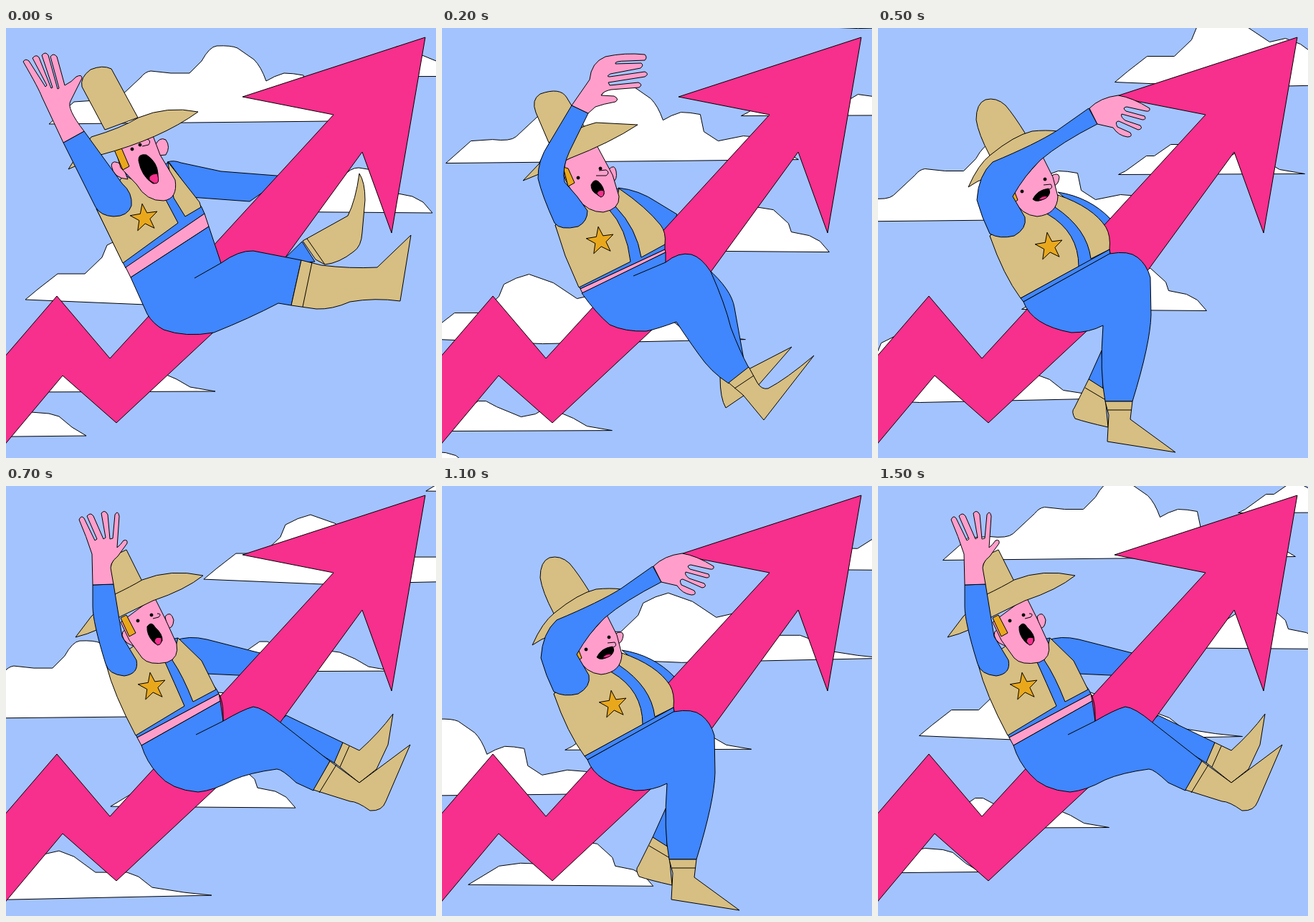
Recreate the animation shown at these times as an HTML page with a canvas. Size 600 by 600 pixels, loop 1600 ms.

```html
<!DOCTYPE html>
<html lang="en">
<head>
<meta charset="utf-8">
<title>Riding the arrow</title>
<style>
html, body { margin: 0; width: 100%; height: 100%; overflow: hidden; background: #a3c3ff; }
canvas { display: block; }
</style>
</head>
<body>
<canvas id="stage" width="600" height="600"></canvas>
<script>
const ctx = document.getElementById('stage').getContext('2d');
const COLORS = { sky: '#a3c3ff', cloud: '#fff', blue: '#4086fd', skin: '#ff9ecb', tan: '#d7be82',
  hot: '#f72f8d', gold: '#e9a81c', ink: '#000', line: null };
const STEP = 100, STEPS = 16, DRIFT = 27.3, LOOP_SHIFT = 440;

const shape = (color, d) => ({ fill: COLORS[color], path: new Path2D(d) });
const dot = (x, y, r = 2, color = 'ink') =>
  shape(color, `M${x - r} ${y}a${r} ${r} 0 1 0 ${2 * r} 0a${r} ${r} 0 1 0 ${-2 * r} 0Z`);

function star(x, y) {
  const points = Array.from({ length: 10 }, (_, i) => {
    const a = i * Math.PI / 5 - 1.72, r = i % 2 ? 8 : 20;
    return `${x + r * Math.cos(a)} ${y + r * Math.sin(a)}`;
  });
  return shape('gold', `M${points.join('L')}Z`);
}

const clouds = [
  'M60 134L95 103 125 101Q150 104 158 97L188 69Q194 61 202 60L230 63 256 63 273 46Q284 26 294 25Q314 24 323 28L346 44Q356 54 363 74Q374 67 388 63Q400 63 415 66L420 90 440 103 475 96 500 98 514 102 532 117 552 129Z',
  'M337 256L380 230 410 226 440 227 470 208Q480 195 492 195L517 199 538 218 542 230 567 235 582 243 595 258Z',
  'M472 68L482 63 511 42 522 42 545 26 556 26 571 34 605 48 625 44 635 38 657 41 678 50 697 61 732 67Z',
  'M27 379L45 364 72 343 110 343 134 320 141 303Q158 293 176 289L210 301 243 323 265 318 286 326 316 348 360 348 376 354 395 369 440 376 478 380 195 386Z'
].map(d => shape('cloud', d));

const arrow = shape('hot', 'M-9 467L71 374 145 461 457 121 330 96 585 13 538 286 497 173 365 354 154 551 79 485-9 590Z');

// Each pose: limbs behind the arrow, then everything in front of it.
const leaningBack = {
  far: [
    shape('blue', 'M225 187Q234 184 244 188L300 200 390 207 340 242 258 236Z'),
    shape('blue', 'M413 298L380 330 431 326Z'),
    shape('tan', 'M414 297L477 262Q488 240 493 203Q501 215 501 240L497 285Q496 305 485 312Q465 328 445 330L432 323Z'),
    shape('line', 'M420 294L445 330')
  ],
  near: [
    shape('blue', 'M126 252L165 205 228 188 273 250 277 259 167 335Z'),
    shape('tan', 'M126 252L163 328 240 272 222 238 165 205Z'),
    shape('tan', 'M226 187L270 243 272 250 250 263 234 237Z'),
    star(193, 265),
    shape('skin', 'M167 334L277 259 283 277 174 348Z'),
    shape('blue', 'M174 348L283 277 300 328Q325 310 345 311L412 324 398 387 380 384Q340 405 290 425Q250 432 220 421Q205 413 197 399Z'),
    shape('line', 'M300 328L263 349'),
    shape('tan', 'M412 324L440 331Q480 336 518 334L565 289 550 381Q515 376 480 382Q455 393 433 392L398 387Z'),
    shape('line', 'M427 327L414 389'),
    shape('tan', 'M138 142L106 82Q103 69 118 58Q135 51 147 57L184 125Z'),
    shape('skin', 'M208 164Q214 151 223 156Q230 166 223 177L212 178Z'),
    shape('skin', 'M162 191Q148 182 147 192Q150 210 170 211Z'),
    shape('skin', 'M150 160L203 145 215 177 236 212Q240 238 220 241Q196 242 182 218L160 195Z'),
    shape('gold', 'M151 170L160 165 172 193 163 198Z'),
    shape('ink', 'M185 185Q184 175 196 177Q211 187 212 203Q213 218 205 217Q189 207 185 185Z'),
    shape('hot', 'M200 212Q198 204 211 203Q216 218 207 217Z'),
    dot(176, 169), dot(187, 163),
    shape('line', 'M190 165L199 163Q203 157 197 155'),
    shape('tan', 'M87 197L98 180 119 152Q160 140 185 125Q225 108 268 117Q215 155 132 177Z'),
    shape('blue', 'M80 160L109 144 162 217Q177 230 175 248Q170 263 150 263Q132 262 125 250Z'),
    shape('skin', 'M80 160L50 96Q46 85 24 47Q27 42 32 46L55 82 57 80 37 42Q42 36 46 41L63 84 65 83 50 38Q55 32 59 38L72 85 74 84 62 40Q66 34 71 40L82 80Q92 75 98 68Q106 64 106 70L90 102Q84 112 109 144Z')
  ]
};

const rising = {
  far: [
    shape('blue', 'M235 216Q255 208 280 214L370 237 345 265 280 262Z'),
    shape('blue', 'M391 320L470 358 459 387 375 335Z'),
    shape('tan', 'M470 358L493 369Q520 345 540 318L533 361 517 395 493 414 458 386Z'),
    shape('line', 'M479 363L466 392')
  ],
  near: [
    shape('blue', 'M140 250L180 225 240 212 294 284 297 290 183 351Z'),
    shape('tan', 'M140 250Q150 290 181 348L249 307Q235 275 222 246L180 222Z'),
    shape('tan', 'M240 212L273 244 293 284 261 301Q247 265 232 243Z'),
    star(204, 280),
    shape('skin', 'M183 351L297 290 299 300 189 362Z'),
    shape('blue', 'M189 362L299 300 303 328Q330 312 345 308Q358 309 383 330L452 384 429 425 405 414Q385 395 378 395Q340 400 317 410Q290 425 268 427Q230 424 212 402Q196 385 189 362Z'),
    shape('line', 'M298 291Q304 305 303 328L265 347'),
    shape('tan', 'M452 384L493 414 564 361 530 440Q525 454 508 453Q490 440 480 440L429 424Z'),
    shape('line', 'M461 389L437 428'),
    shape('tan', 'M152 155L145 115Q150 95 168 89L190 133Z'),
    shape('skin', 'M222 182Q230 173 234 187Q233 200 225 198Z'),
    shape('skin', 'M177 205Q162 196 162 208Q165 222 184 224Z'),
    shape('skin', 'M160 190L207 155 222 185 238 220Q242 240 225 246Q200 251 190 240L172 215Z'),
    shape('gold', 'M160 184L168 180 181 205 172 210Z'),
    shape('ink', 'M197 196Q203 188 208 197Q219 207 218 216Q212 225 205 217Q196 207 197 196Z'),
    shape('hot', 'M207 217Q208 209 217 212Q218 222 211 222Z'),
    dot(184, 188), dot(203, 180),
    shape('line', 'M205 185L213 183Q218 178 211 178'),
    shape('tan', 'M97 211L119 182 150 152Q175 140 190 131Q230 115 275 125Q250 145 205 160L160 182Q130 203 97 211Z'),
    shape('blue', 'M121 138L150 137 162 210 182 243Q186 262 165 265Q143 263 139 248Q121 190 121 168Z'),
    shape('skin', 'M121 138L120 95Q112 70 102 47Q105 40 109 45L124 76 127 74 113 42Q118 36 122 42L136 74 139 72 133 38Q138 32 142 40L145 74 149 73 152 40Q156 33 158 42L155 86Q160 82 164 76Q170 74 169 80L156 98Q143 108 147 120L150 137Z')
  ]
};

const falling = {
  far: [
    shape('blue', 'M246 223Q275 226 300 243L328 260 312 300Q280 260 246 223Z'),
    shape('blue', 'M370 335Q404 365 408 390L421 462 400 470Z'),
    shape('tan', 'M388 487L428 476 488 445 440 500 396 530Q388 517 388 487Z')
  ],
  near: [
    shape('blue', 'M158 275L205 230 247 224 311 302 311 309 193 364Z'),
    shape('tan', 'M158 275L205 245 232 252Q258 280 263 326L191 362 172 318Z'),
    shape('tan', 'M247 224Q285 250 305 275Q313 285 311 302L278 320Q272 280 242 249Z'),
    star(221, 297),
    shape('skin', 'M193 364L311 309 312 313 196 370Z'),
    shape('blue', 'M195 370L312 313 312 327Q330 312 348 316Q362 320 375 340Q395 385 403 418Q415 450 428 474L400 496Q375 480 358 455Q340 430 327 410Q300 420 285 423Q255 424 234 414Q215 398 195 370Z'),
    shape('line', 'M312 327L267 346'),
    shape('tan', 'M428 473L400 495 420 512 449 547 519 457Q480 490 455 503Q446 505 440 495Z'),
    shape('line', 'M435 485L408 503'),
    shape('tan', 'M149 160L131 118Q124 100 137 92Q165 82 174 97L200 140Z'),
    shape('skin', 'M233 197Q241 189 243 200Q245 212 238 215Z'),
    shape('skin', 'M172 185L215 162 238 205 247 235Q248 253 225 257Q203 257 190 238Q175 222 170 205Z'),
    shape('gold', 'M169 194L176 196 185 216 176 221Z'),
    shape('ink', 'M208 219Q212 210 218 214Q227 222 226 232Q222 238 216 232Q208 228 208 219Z'),
    shape('hot', 'M216 231Q218 225 226 227Q227 236 221 236Z'),
    dot(190, 209), dot(221, 196),
    shape('line', 'M215 206L229 206Q235 202 229 198L219 199'),
    shape('tan', 'M113 213L135 190 150 160Q190 138 215 132L273 135Q235 160 178 182L135 204Z'),
    shape('blue', 'M181 108L204 119 178 172Q167 195 171 215Q190 235 203 255Q203 270 190 277Q165 283 157 272Q140 235 134 210Q133 185 150 160Z'),
    shape('skin', 'M181 108L206 72Q208 48 228 40Q255 34 283 37Q287 41 283 45L258 46Q240 46 242 50L278 49Q282 52 277 56L235 64Q228 68 234 68L283 61Q290 64 283 68L232 76 234 80 274 76Q281 79 275 83L236 86Q225 88 222 94L240 95Q248 99 242 103Q225 106 214 110L204 119Z')
  ]
};

const bentForward = {
  far: [
    shape('blue', 'M251 229Q295 236 324 266L318 285 290 262Z'),
    shape('blue', 'M312 450L294 490 314 504Z'),
    shape('tan', 'M294 490L316 504 321 557Q290 550 275 545Q269 535 274 530Z'),
    shape('line', 'M289 502L316 518')
  ],
  near: [
    shape('blue', 'M156 290L205 240 251 233 323 309 324 315 203 382Z'),
    shape('tan', 'M156 290L205 250 237 260Q280 285 280 333L199 377Q175 345 156 290Z'),
    shape('tan', 'M251 233Q300 250 318 278Q325 290 323 309L297 322Q292 280 247 250Z'),
    star(239, 305),
    shape('blue', 'M199 377L323 309 324 315 203 382Z'),
    shape('blue', 'M203 382L323 315Q350 310 362 320Q375 330 380 348L381 400Q380 440 355 521L317 521Q309 480 314 415Q295 425 270 425Q215 415 203 382Z'),
    shape('tan', 'M317 521L355 521 352 546 415 592 320 577 322 540Z'),
    shape('line', 'M320 533L354 533'),
    shape('tan', 'M156 178Q140 148 137 128Q137 105 150 100Q165 96 178 108Q190 122 206 148Z'),
    shape('skin', 'M242 206Q252 201 253 208Q252 218 246 220Z'),
    shape('skin', 'M190 225L230 180 244 208 251 235Q250 260 222 263Q200 261 190 240Z'),
    shape('gold', 'M184 235L190 227 195 240 188 245Z'),
    shape('ink', 'M216 239Q222 226 238 224Q242 230 236 236Q222 245 216 239Z'),
    shape('hot', 'M224 240Q228 233 237 235Q233 240 224 240Z'),
    dot(201, 228), dot(233, 211),
    shape('line', 'M231 219L241 218Q245 223 239 225'),
    shape('tan', 'M126 222Q140 190 157 177Q190 150 215 144Q235 142 250 144L200 190 139 214Z'),
    shape('blue', 'M294 112L306 134Q255 160 227 184Q205 205 188 235L205 264Q208 280 190 290Q170 295 156 287Q145 265 138 240Q140 205 160 187Q220 162 250 143Z'),
    shape('skin', 'M295 112Q310 97 335 94Q355 97 379 112Q380 117 374 116L347 110Q340 111 346 116L372 123Q375 128 369 128L340 120Q338 124 345 129L366 136Q370 141 363 142L336 130Q330 130 334 138L352 146Q356 152 348 152Q335 150 328 139L306 134Z')
  ]
};

const farthest = { ...bentForward, tilt: 0.05 };
const poses = [leaningBack, rising, falling, bentForward, farthest];

function paint({ fill, path }) {
  if (fill) {
    ctx.fillStyle = fill;
    ctx.fill(path);
  }
  ctx.stroke(path);
}

function paintTilted(shapes, tilt = 0) {
  ctx.save();
  ctx.translate(260, 410);
  ctx.rotate(tilt);
  ctx.translate(-260, -410);
  shapes.forEach(paint);
  ctx.restore();
}

function draw(step) {
  ctx.fillStyle = COLORS.sky;
  ctx.fillRect(0, 0, 600, 600);
  for (let n = -1; n <= 1; n++) {
    const shift = n * LOOP_SHIFT - step * DRIFT;
    ctx.save();
    ctx.translate(shift, -shift);
    clouds.forEach(paint);
    ctx.restore();
  }
  const phase = step % 8;
  const pose = poses[Math.min(phase, 8 - phase)];
  paintTilted(pose.far, pose.tilt);
  paint(arrow);
  paintTilted(pose.near, pose.tilt);
}

ctx.lineWidth = 1;
ctx.lineJoin = 'round';
const start = performance.now();
function tick() {
  draw(Math.floor((performance.now() - start) / STEP) % STEPS);
  requestAnimationFrame(tick);
}
tick();
</script>
</body>
</html>
```
